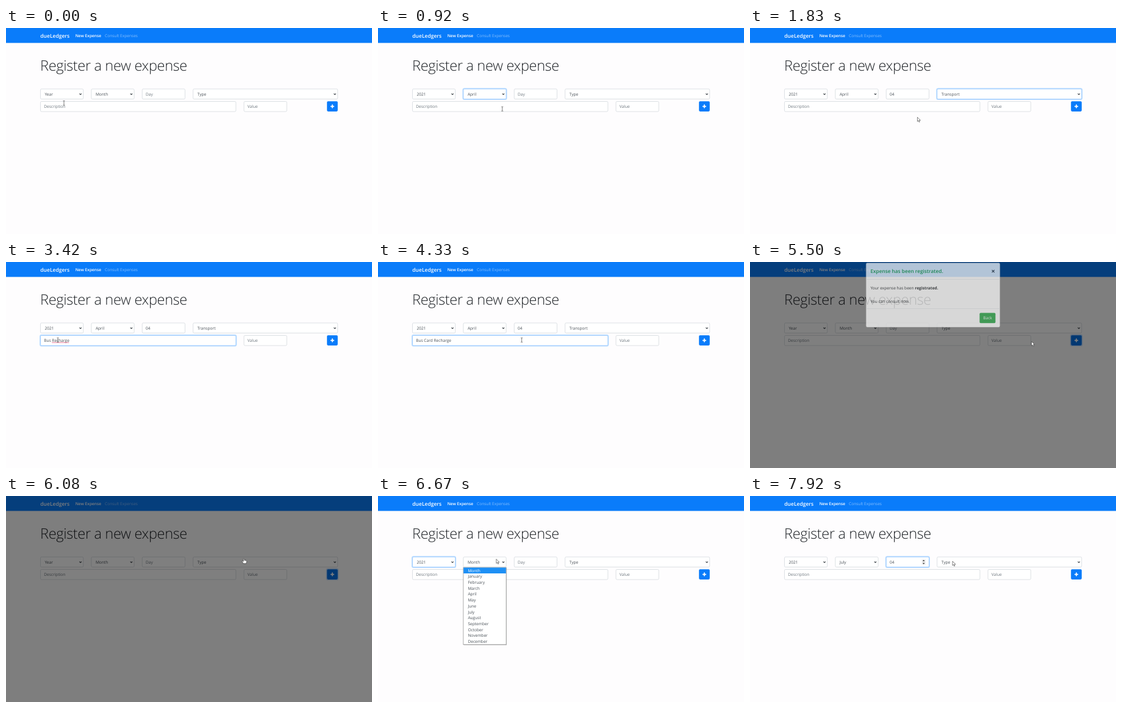
Recreate the animation shown at these times as an HTML page. Size 600 by 338 pixels, loop 8000 ms.

```html
<!DOCTYPE html>
<html lang="en">
<head>
<meta charset="utf-8">
<title>Register a new expense</title>
<style>
  html, body { margin: 0; width: 100%; height: 100%; overflow: hidden; background: #fefdfe; }
  svg { display: block; width: 100vw; height: 100vh; }
  text { font-family: "Open Sans", "Noto Sans", sans-serif; font-size: 6.6px; fill: #495057; white-space: pre; text-rendering: geometricPrecision; }
  .brand { font-size: 8.5px; font-weight: 600; fill: #fff; }
  .link { font-weight: 600; fill: #fff; }
  .muted { fill: #fff; fill-opacity: .5; }
  .title { font-size: 23.6px; font-weight: 300; letter-spacing: -.37px; fill: #212529; }
  .hint { fill: #6c757d; }
  .light { fill: #fff; }
  .heading { font-size: 8.25px; font-weight: 600; fill: #28a745; }
  .body { fill: #212529; }
  .bold { font-weight: 700; }
  .close { font-size: 11px; font-weight: 700; fill: #444; }
</style>
</head>
<body>
<svg id="stage" viewBox="0 0 600 338" preserveAspectRatio="none"></svg>
<script>
const LOOP = 8000, FPS = 12, TRAVEL = 170;
const LEFT = 56.5, COL = 83.4, GUTTER = 13.2, FIELD_H = 16.6, ROW = 9.7, MENU_TOP = 117.5;
const BLUE = '#0a7cfa';

// Form grid: column, columns spanned, row
const cell = (col, span, row, hint, options) =>
  ({ x: LEFT + col * COL, y: 100 + row * 20.5, w: span * COL - GUTTER, h: FIELD_H, hint, options });

const fields = {
  year: cell(0, 1, 0, 'Year', ['Year', '2020', '2021', '2022']),
  month: cell(1, 1, 0, 'Month', ['Month', 'January', 'February', 'March', 'April', 'May', 'June',
    'July', 'August', 'September', 'October', 'November', 'December']),
  day: cell(2, 1, 0, 'Day'),
  type: cell(3, 3, 0, 'Type', ['Type', 'Food', 'Education', 'Leisure', 'Health', 'Transport']),
  desc: cell(0, 4, 1, 'Description'),
  value: cell(4, 1, 1, 'Value')
};
const plus = { x: 526.2, y: 120.3, w: 17.6, h: 16.6 };
const back = { x: 376.4, y: 94.3, w: 26, h: 16.8 };
const empty = { year: '', month: '', day: '', type: '', desc: '', value: '' };

// The session: pointer stops and state changes, in order of time
const stops = [], events = [];
const moveTo = (at, x, y) => stops.push({ at, x, y });
const change = (at, patch) => events.push({ at, patch });

function type(name, str, at, step, head = '', tail = '') {
  [...str].forEach((_, i) => change(at + i * step, { [name]: head + str.slice(0, i + 1) + tail }));
}
function click(name, at, dx = 15) {
  moveTo(at, fields[name].x + dx, fields[name].y + 7.5);
  change(at, { focus: name });
}
function pick(name, option, openAt, pickAt) {
  const { x, y, options } = fields[name];
  moveTo(openAt, x + 54, y + 3.5);
  change(openAt, { menu: name });
  moveTo(pickAt, x + 25, MENU_TOP + (options.indexOf(option) + .5) * ROW);
  change(pickAt, { menu: '', focus: name, [name]: option });
}

moveTo(0, 95, 123);
change(0, { ...empty, focus: '', menu: '' });
pick('year', '2021', 250, 420);
pick('month', 'April', 580, 830);
click('day', 1000);
type('day', '04', 1170, 80);
pick('type', 'Transport', 1420, 1750);
click('desc', 1890, 175);
moveTo(2250, 250, 150);
type('desc', 'Bus Recharge', 2250, 75);
click('desc', 3420, 28.5);
type('desc', 'Card ', 3660, 120, 'Bus ', 'Recharge');
click('value', 4420);
moveTo(4600, 430, 140);
type('value', '120,00', 4660, 84);
moveTo(5330, 532.5, 127.5);
change(5420, { ...empty, focus: 'plus' });
moveTo(5500, 461.5, 130.5);
moveTo(5830, 390, 102);
pick('year', '2021', 6330, 6500);
pick('month', 'July', 6580, 7000);
click('day', 7250);
type('day', '04', 7580, 85);
moveTo(7920, 332, 107);

const clamp = v => Math.min(1, Math.max(0, v));
const ramp = (t, from, length) => clamp((t - from) / length);
const easeOut = u => 1 - (1 - u) ** 2;
const text = (x, y, str, cls = '') => `<text x="${x}" y="${y}" class="${cls}">${str}</text>`;
const rect = (x, y, w, h, attrs) => `<rect x="${x}" y="${y}" width="${w}" height="${h}" ${attrs}/>`;
const line = (d, color, width) => `<path d="${d}" fill="none" stroke="${color}" stroke-width="${width}"/>`;
const inside = (p, b) => p.x >= b.x && p.x <= b.x + b.w && p.y >= b.y && p.y <= b.y + b.h;
const ring = b => rect(b.x - .7, b.y - .7, b.w + 1.4, b.h + 1.4, 'rx="2.4" fill="none" stroke="#bfdeff" stroke-width="1.5"');

function pointerAt(t) {
  const next = stops.find(s => s.at >= t) || stops.at(-1);
  const prev = stops[Math.max(0, stops.indexOf(next) - 1)];
  const from = Math.max(prev.at, next.at - TRAVEL);
  const u = ramp(t, from, next.at - from || 1);
  return { x: prev.x + (next.x - prev.x) * u, y: prev.y + (next.y - prev.y) * u };
}

function dialogAt(t) {
  const slide = easeOut(ramp(t, 5410, 300)) - easeOut(ramp(t, 5920, 300));
  return {
    top: 12.3 - 22 * (1 - slide),
    opacity: ramp(t, 5410, 130) - ramp(t, 5920, 150),
    shade: .5 * (ramp(t, 5340, 150) - ramp(t, 6170, 150))
  };
}

function drawField(name, s) {
  const f = fields[name], focused = s.focus === name, val = s[name];
  let out = focused ? ring(f) : '';
  out += rect(f.x, f.y, f.w, f.h, `rx="1.8" fill="#fff" stroke="${focused ? '#80bdff' : '#ced4da'}" stroke-width=".7"`);
  if (f.options) {
    out += text(f.x + 7, f.y + 11.2, val || f.hint);
    out += line(`M${f.x + f.w - 6.3} ${f.y + 7.6}l1.7 1.7 1.7-1.7`, '#343a40', 1.15);
  } else {
    out += text(f.x + 5.7, f.y + 10.6, val || f.hint, val ? '' : 'hint');
  }
  if (name === 'day' && focused) {
    out += rect(281.5, 103.5, 6.5, 9.5, 'fill="#f1f1f1"');
    out += '<path d="M282.8 107l1.9-2.2 1.9 2.2zM282.8 109.7l1.9 2.2 1.9-2.2z" fill="#444"/>';
  }
  if (name === 'desc' && focused && val === 'Bus Recharge')
    out += line('M75.2 132.2' + 'q.5-.8 1 0t1 0'.repeat(14), '#e0285a', .7);
  return out;
}

function drawMenu(name, p) {
  const { x, w, options } = fields[name], h = options.length * ROW;
  const hover = inside(p, { x, y: MENU_TOP, w, h: h - .1 }) ? Math.floor((p.y - MENU_TOP) / ROW) : 0;
  return rect(x + .6, MENU_TOP + .5, w + .4, h + .8, 'fill="#000" opacity=".18"') +
    rect(x, MENU_TOP - .4, w, h + .6, 'fill="#fff" stroke="#767676" stroke-width=".6"') +
    rect(x + .3, MENU_TOP + hover * ROW, w - .6, ROW - .2, 'fill="#1e90f5"') +
    options.map((o, i) => text(x + 7.5, MENU_TOP + i * ROW + 7.1, o, i === hover ? 'light' : '')).join('');
}

function drawPlus(s, p) {
  const focused = s.focus === 'plus', active = focused || inside(p, plus);
  return (focused ? ring(plus) : '') +
    rect(plus.x, plus.y, plus.w, plus.h, `rx="1.8" fill="${active ? '#0570e6' : BLUE}"`) +
    line('M532 128.6h6M535 125.6v6', '#fff', 1.7);
}

function drawDialog(d) {
  if (!d.opacity) return '';
  return `<g transform="translate(190.2 ${d.top})" opacity="${d.opacity}">` +
    rect(0, 0, 219.6, 105.5, 'rx="2.2" fill="#fff" stroke="#999" stroke-width=".4"') +
    text(7.2, 16, 'Expense has been registrated.', 'heading') + text(205.2, 17.4, '×', 'close') +
    line('M0 27h219.6M0 75h219.6', '#dee2e6', .6) +
    text(7.2, 43.8, 'Your expense has been <tspan class="bold">registrated.</tspan>', 'body') +
    text(7.2, 65, 'You can consult now.', 'body') +
    rect(186.2, 82, back.w, back.h, 'rx="1.8" fill="#28a745"') + text(192, 92.8, 'Back', 'light') + '</g>';
}

function drawPointer(p, shaded) {
  let shape = '<path d="M0 0v7l1.6-1.5 1.1 2.6 1.2-.5-1.1-2.5h2.2z" fill="#fff" stroke="#333" stroke-width=".6"/>';
  if (inside(p, shaded ? back : plus))
    shape = '<path d="M-.8.8q.8-1.6 1.6 0v2.6l3 .6q.9.3.8 1.4l-.7 3.4h-4.6l-2.4-3.4q.2-1.2 1.3-.6l1 .7z" fill="#fff" stroke="#222" stroke-width=".6"/>';
  else if (!shaded && Object.values(fields).some(f => !f.options && inside(p, f)))
    shape = line('M-1.5-3.6h1l.5.4.5-.4h1M0-3.2v6.4M-1.5 3.6h1l.5-.4.5.4h1', '#444', .7);
  return `<g transform="translate(${p.x} ${p.y})">${shape}</g>`;
}

function draw(t) {
  const s = Object.assign({}, ...events.filter(e => e.at <= t).map(e => e.patch));
  const p = pointerAt(t), d = dialogAt(t);
  return rect(0, 0, 600, 338, 'fill="#fefdfe"') + rect(0, 0, 600, 24.5, `fill="${BLUE}"`) +
    text(56.3, 15.7, 'dueLedgers', 'brand') + text(113.7, 15.1, 'New Expense', 'link') +
    text(162, 15.1, 'Consult Expenses', 'muted') +
    text(56, 70.3, 'Register a new expense', 'title') +
    Object.keys(fields).map(n => drawField(n, s)).join('') + drawPlus(s, p) +
    (s.menu ? drawMenu(s.menu, p) : '') +
    (d.shade ? rect(0, 0, 600, 338, `fill="#000" opacity="${d.shade}"`) : '') +
    drawDialog(d) + drawPointer(p, d.shade > 0);
}

const stage = document.getElementById('stage'), start = performance.now();
let shown = -1;
function tick() {
  const elapsed = (performance.now() - start) % LOOP;
  const step = Math.min(LOOP * FPS / 1000 - 1, Math.floor((elapsed + 4) * FPS / 1000));
  if (step !== shown) {
    shown = step;
    stage.innerHTML = draw(Math.round(step * 100 / FPS) * 10);
  }
  requestAnimationFrame(tick);
}
tick();
</script>
</body>
</html>
```
